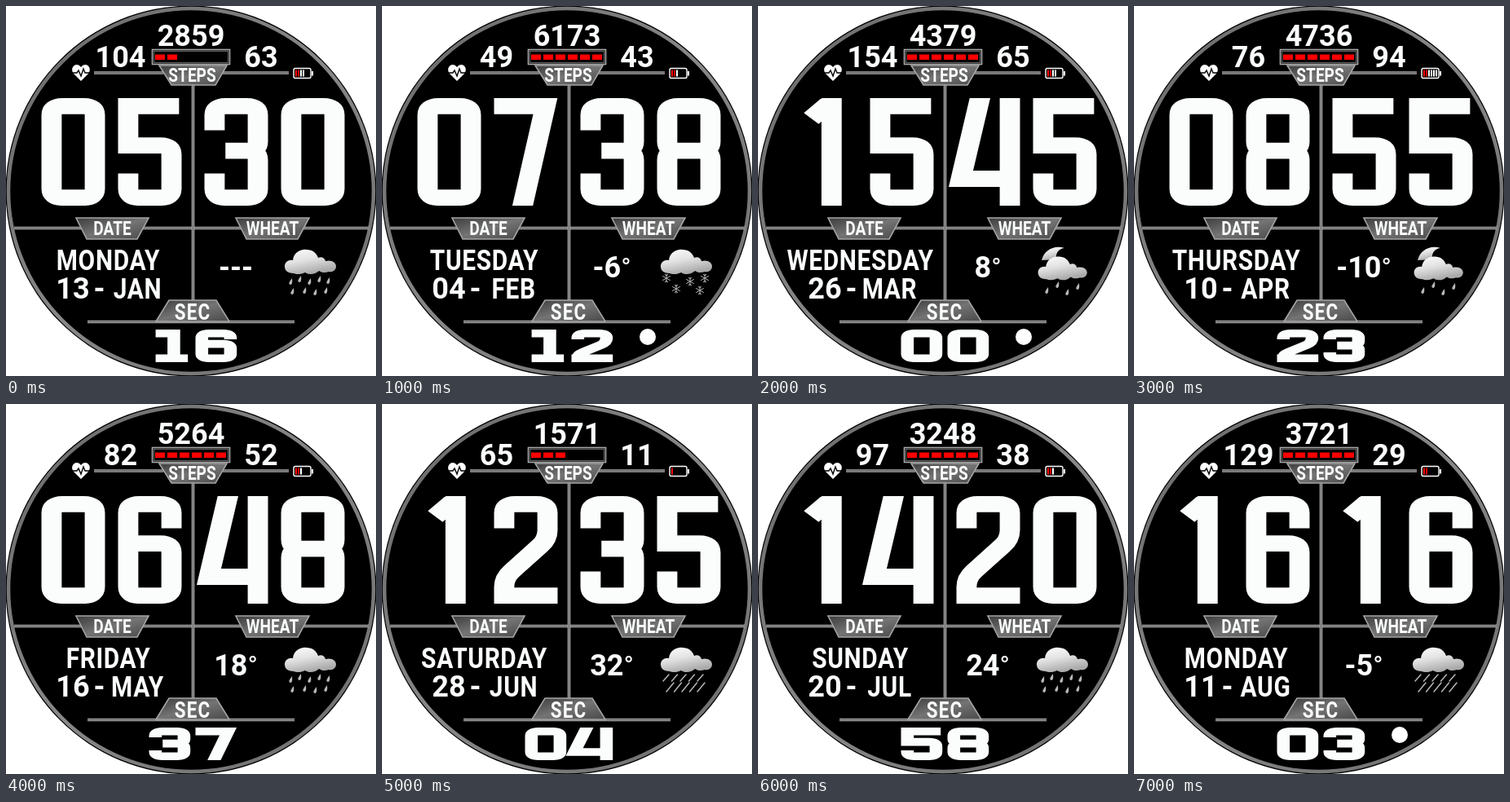
An HTML page that plays this animation: 454x454 px, repeating every 8000 ms.

```html
<!DOCTYPE html>
<html lang="en">
<head>
<meta charset="utf-8">
<title>Watch face</title>
<style>
  html, body { margin: 0; width: 100%; height: 100%; overflow: hidden; background: #fff; }
  svg { display: block; }
  body > svg { width: 454px; height: 454px; }
  text { font: 700 36px Roboto, sans-serif; fill: #fbfdfd; text-anchor: middle; }
  .word { letter-spacing: .8px; }
  .label { font-size: 23px; }
  .sec { font-size: 27px; letter-spacing: 1.4px; }
  .degree { font-size: 33px; font-weight: 400; }
  .rule { stroke: #aaa; stroke-width: 3.6; }
  .groove { stroke: #666; stroke-width: 1.4; }
  .tab { fill: url(#metal); stroke: #a5a5a5; stroke-width: 1.6; }
  .digit { fill: none; stroke: #fbfdfd; stroke-miterlimit: 8; }
  .cloud { fill: url(#mist); }
  .drop { fill: #b9b9b9; }
  .line { fill: none; stroke: #b5b5b5; stroke-width: 1.5; stroke-linecap: round; }
  .state { visibility: hidden; animation: show 8s step-end infinite; }
  @keyframes show {
    0% { visibility: visible; }
    12.5%, 100% { visibility: hidden; }
  }
</style>
</head>
<body>
<svg viewBox="0 0 454 454">
  <defs>
    <linearGradient id="metal" x1="0" y1="0" x2="1" y2="1">
      <stop stop-color="#3c3c3c"/><stop offset=".5" stop-color="#747474"/><stop offset="1" stop-color="#484848"/>
    </linearGradient>
    <linearGradient id="mist" x1="0" y1="0" x2=".4" y2="1">
      <stop stop-color="#fff"/><stop offset=".5" stop-color="#e2e2e2"/><stop offset="1" stop-color="#aaa"/>
    </linearGradient>
    <linearGradient id="rim" x1="0" y1="0" x2="1" y2="1">
      <stop stop-color="#666"/><stop offset=".5" stop-color="#888"/><stop offset="1" stop-color="#6a6a6a"/>
    </linearGradient>
    <path id="cloud" class="cloud" d="M353 328C345 328 342 324 342 319.500C342 314 347 311 352 312C353 303 361 298 369 299C376 299 381 303 383 309C387 307 391 309 392 313C400 311 405 315 405 319.500C405 324 401 327 396 326C391 328 387 327 384 325C379 330 371 330 367 327C363 329 357 330 353 328Z"/>
    <path id="flake" class="line" style="stroke-width:1" d="M0-5V5M-4.5-2.5L4.5 2.5M-4.5 2.5L4.5-2.5M-1.8-4.6L0-3L1.8-4.6M-1.8 4.6L0 3L1.8 4.6"/>
    <path id="drop" class="drop" d="M2-4Q3 4 0 4Q-4 3 2-4Z"/>
  </defs>

  <circle cx="227" cy="227" r="227.5"/>
  <circle cx="227" cy="227" r="224" fill="none" stroke="url(#rim)" stroke-width="4.500"/>

  <g id="rules"></g>
  <path class="tab" d="M188 73H271L257 97H203Z"/>
  <path class="tab" d="M86 260H175L161 286H99Z"/>
  <path class="tab" d="M282 260H372L358 286H295Z"/>
  <path class="tab" d="M200 361H258L274 387H184Z"/>
  <g id="labels"></g>

  <path fill="#fff" d="M92 92L83 83C79 78 82 72 87 72Q90 72 92 75Q94 72 97 72C102 72 105 78 101 83Z"/>
  <path fill="none" stroke="#000" stroke-width="1.4" d="M80 82H87L89 79L92 86L95 77L97 82H104"/>
  <rect x="179.5" y="53.5" width="95" height="18" stroke="#aaa" stroke-width="1.6"/>
  <rect x="181.5" y="55.5" width="91" height="14" fill="none" stroke="#666"/>
  <rect x="353" y="76.5" width="21" height="12" rx="2" stroke="#fff" stroke-width="1.4"/>
  <path d="M376 80V85.5" stroke="#fff" stroke-width="2"/>
  <g id="states"></g>
</svg>
<script>
const $ = id => document.getElementById(id);

const text = (s, x, y, cls = '') => `<text class="${cls}" x="${x}" y="${y}">${s}</text>`;
// Words share one condensed cut; numerals keep their normal width.
const word = (s, x, y, cls = 'word') =>
  `<g transform="translate(${x} ${y}) scale(.83 1)">${text(s, 0, 0, cls)}</g>`;
const rect = (x, y, w, h, fill) =>
  `<rect x="${x}" y="${y}" width="${w}" height="${h}" fill="${fill}"/>`;
const use = (id, spots) =>
  spots.map(([x, y]) => `<use href="#${id}" x="${x}" y="${y}"/>`).join('');

// Polyline with rounded corners.
function bend(points, r) {
  const toward = (p, q) => {
    const d = Math.hypot(q[0] - p[0], q[1] - p[1]);
    const k = Math.min(r, d) / d;
    return [p[0] + (q[0] - p[0]) * k, p[1] + (q[1] - p[1]) * k];
  };
  return points.map((p, i) => {
    if (!i) return `M${p}`;
    if (i === points.length - 1) return `L${p}`;
    return `L${toward(p, points[i - 1])}Q${p} ${toward(p, points[i + 1])}`;
  }).join('');
}

function digitPath(d, { w, h, t, foot }) {
  const L = t / 2, R = w - L, T = L, B = h - L, M = h * .49, N = h * .44, C = w / 2;
  const curve = (...points) => bend(points, t * .55);
  const ring = (a, b) => curve([C, a], [R, a], [R, b], [L, b], [L, a], [C, a]);
  switch (+d) {
    case 0: return ring(T, B);
    case 1: return `M${w * .6} 0V${h}` + (foot
      ? `M${w * .16} ${T}H${w * .6}M${w * .16} ${B}H${w * .94}`
      : `M${w * .28} ${h * .19}L${w * .6} ${h * .03}`);
    case 2: return curve([L, h * .3], [L, T], [R, T], [R, h * .4], [L, h * .76], [L, B - 1]) +
      `M0 ${B}H${w}`;
    case 3: return curve([L, h * .3], [L, T], [R, T], [R, M], [w * .33, M]) +
      curve([C, M], [R, M], [R, B], [L, B], [L, h * .7]);
    case 4: return `M${w * .39} ${-h * .05}L${w * .07} ${h * .75}H${R}M${R} 0V${h}`;
    case 5: return `M${w * .96} ${T}H${L}V${N}H${C}` +
      curve([C, N], [R, N], [R, B], [L, B], [L, h * .7]);
    case 6: return curve([R, h * .3], [R, T], [L, T], [L, B], [R, B], [R, N], [L, N]);
    case 7: return `M0 ${T}H${w * .9}M${w * .855} ${-h * .05}L${w * .43} ${h * 1.05}`;
    case 8: return ring(T, M) + ring(M, B);
  }
}

const clock = { w: 69, h: 146.7, t: 22, sx: 1.13, sy: .9 };
const seconds = { w: 39, h: 50, t: 12, sx: 1.3, sy: .8, foot: true };

// The nested svg trims slanted strokes level with the row.
const digits = (s, xs, y, size) => `<svg y="${y}" height="${size.h * size.sy}">` +
  [...s].map((d, i) =>
    `<path class="digit" stroke-width="${size.t}" d="${digitPath(d, size)}"
      transform="translate(${xs[i]}) scale(${size.sx} ${size.sy})"/>`).join('') + '</svg>';

const sky = {
  drops: () => use('cloud', [[0, 0]]) + use('drop', [
    [349, 338], [360, 335], [372, 338], [384, 335], [395, 337],
    [351, 350], [366, 349], [379, 351], [392, 349]]),
  snow: () => use('cloud', [[0, 0]]) + use('flake', [
    [349, 334], [378, 338], [396, 334], [361, 347], [390, 349]]),
  night: () => '<path class="cloud" d="M348 312C351 300 363 293 376 297C368 298 365 304 366 311Z"/>' +
    '<use href="#cloud" transform="translate(17 22) scale(.955)"/>' +
    use('drop', [[354, 349], [367, 342], [379, 351], [392, 344]]),
  storm: () => {
    let d = '';
    for (let i = 0; i < 5; i++) d += `M${352 + i * 10.5} 332l-7 8M${358 + i * 9.5} 342l-9 11`;
    return use('cloud', [[0, 0]]) + `<path class="line" d="${d}"/>`;
  }
};

// time, seconds, steps, bars, pulse, battery, weekday, day, month, temperature, sky, link lost
const states = [
  ['0530', '16', 2859, 2, 104, 63, 'MONDAY', '13', 'JAN', '---', 'drops', 0],
  ['0738', '12', 6173, 6, 49, 43, 'TUESDAY', '04', 'FEB', '-6°', 'snow', 1],
  ['1545', '00', 4379, 6, 154, 65, 'WEDNESDAY', '26', 'MAR', '8°', 'night', 1],
  ['0855', '23', 4736, 6, 76, 94, 'THURSDAY', '10', 'APR', '-10°', 'night', 0],
  ['0648', '37', 5264, 6, 82, 52, 'FRIDAY', '16', 'MAY', '18°', 'drops', 0],
  ['1235', '04', 1571, 3, 65, 11, 'SATURDAY', '28', 'JUN', '32°', 'storm', 0],
  ['1420', '58', 3248, 6, 97, 38, 'SUNDAY', '20', 'JUL', '24°', 'drops', 0],
  ['1616', '03', 3721, 6, 129, 29, 'MONDAY', '11', 'AUG', '-5°', 'storm', 1]
];

function draw([time, sec, steps, bars, pulse, battery, weekday, day, month, temp, weather, lost], i) {
  let s = digits(time, [43.5, 137.5, 243.5, 337.5], 113, clock) +
    digits(sec, [175.5, 232.5], 397, seconds);
  s += text(steps, 227, 49) + text(pulse, 140.5, 75) + text(battery, 313, 75);
  for (let n = 0; n < bars; n++) s += rect(183 + n * 15, 59.5, 12, 6.5, '#f00');
  for (let n = 0; n < Math.ceil(battery / 18); n++)
    s += rect(355 + n * 3, 78.5, 2, 8, n < 2 ? '#f00' : '#fff');
  s += word(weekday, 125.5, 324) + text(day, 82, 359) + text('-', 114.5, 359) + word(month, 161.5, 359);
  s += text(temp.replace('°', '<tspan class="degree">°</tspan>'), 282, 333) + sky[weather]();
  if (lost) s += '<circle cx="326" cy="406" r="10" fill="#fff"/>';
  return `<g class="state" style="animation-delay:${i - states.length}s">${s}</g>`;
}

$('rules').innerHTML = ['M10 272.5H446', 'M229.5 97V361', 'M108 82H193M266 82H347', 'M100 387.5H354']
  .map(d => `<path class="rule" d="${d}"/><path class="groove" d="${d}"/>`).join('');
$('labels').innerHTML = word('STEPS', 228.5, 93, 'label') + word('DATE', 130.5, 281, 'label') +
  word('WHEAT', 327, 281, 'label') + word('SEC', 229, 385, 'sec');
$('states').innerHTML = states.map(draw).join('');
</script>
</body>
</html>
```
